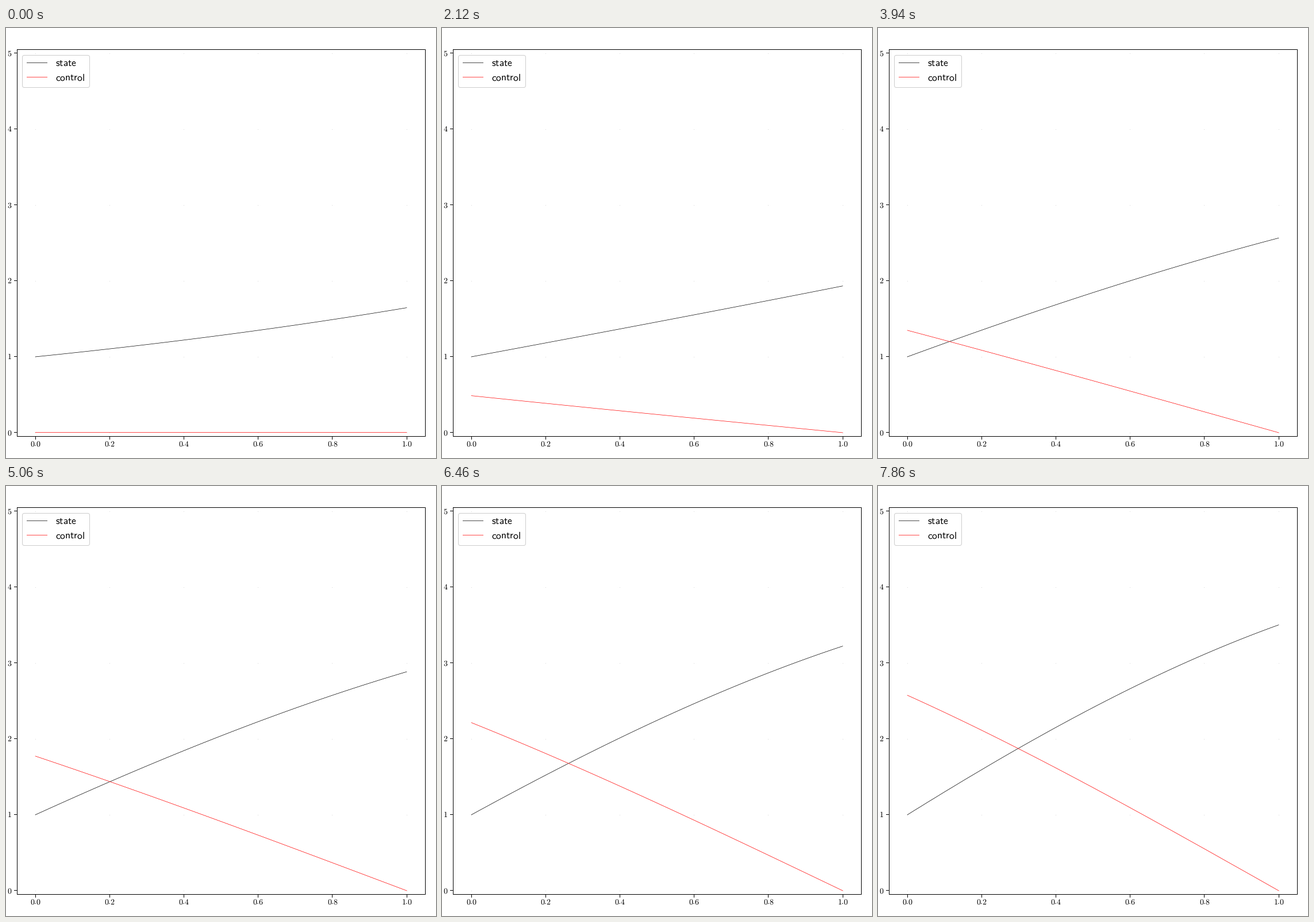
Write a matplotlib script that moves like this. It is 748x748 px and loops after 8 s.

```python
import matplotlib.pyplot as plt
import numpy as np
from matplotlib.animation import FuncAnimation
from matplotlib.patches import FancyBboxPatch

SIZE, DPI = 748, 100
PX = 72 / DPI            # one pixel in points
TICK_MS = 20
FRAMES = 400
HOLD, STEP = 71, 7       # ticks before the first update, ticks per update
RATE = 0.05              # relaxation of the control
THIN = 0.7               # curve width in pixels

plt.rcParams["mathtext.fontset"] = "cm"
plt.rcParams["text.hinting"] = "none"
fig = plt.figure(figsize=(SIZE / DPI, SIZE / DPI), dpi=DPI, facecolor="white")
ax = fig.add_axes([0, 0, 1, 1])
ax.set_xlim(0, SIZE)
ax.set_ylim(SIZE, 0)
ax.axis("off")


def to_x(t):
    return 51.1 + 645.9 * t


def to_y(v):
    return 703.95 - 132 * v


def col(t):
    return np.floor(to_x(t)) + 0.5


def row(v):
    return np.ceil(to_y(v)) - 0.5


def line(xs, ys, color="black", width=1.0, **kw):
    return ax.plot(xs, ys, color=color, lw=width * PX, snap=False, **kw)[0]


def label(x, y, text, size, ha="center"):
    ax.text(x, y, f"${text}$", fontsize=size, ha=ha, va="baseline", zorder=7)


def sweep(n, updates):
    """Euler forward-backward sweep for x' = x/2 + u, p' = -x - p/2, p(1) = 0."""
    h = 1 / n
    u = np.zeros(n + 1)
    x, p = np.ones(n + 1), np.zeros(n + 1)
    states = []
    for k in range(updates + 1):
        old = u
        if k:
            u = (1 - RATE) * u + RATE * p
        for j in range(n):
            x[j + 1] = x[j] + h * (x[j] / 2 + old[j])
        for j in range(n, 0, -1):
            p[j - 1] = p[j] + h * (x[j] + p[j] / 2)
        if k:
            u = (1 - RATE) * old + RATE * p
        states.append((x.copy(), u))
    return states


# grid crossings, ticks and tick labels
xticks = np.linspace(0, 1, 6)
yticks = np.arange(6)
gx, gy = np.meshgrid(col(xticks), row(yticks))
ax.plot(gx.ravel(), gy.ravel(), ls="none", marker="s", ms=PX, mew=0,
        color="#d8d8d8", snap=False, zorder=1)

for t in xticks:
    line([col(t)] * 2, [710.5, 715.5])
    label(to_x(t) + 0.3, 728, f"{t:.1f}", 10)
for v in yticks:
    line([14.5, 19.5], [row(v)] * 2)
    label(6.1, to_y(v) + 4.5, str(v), 10)

# curves
N = 100
T = np.linspace(0, 1, N + 1)
STATES = sweep(N, (FRAMES - 1 - HOLD) // STEP + 1)
state = line(to_x(T), to_y(STATES[0][0]), width=THIN, zorder=3)
control = line(to_x(T), to_y(STATES[0][1]), "red", width=THIN, zorder=3)

# frame
line([19.5, 729.5, 729.5, 19.5, 19.5], [37.5, 37.5, 710.5, 710.5, 37.5],
     zorder=4, solid_joinstyle="miter")

# legend
ax.add_patch(FancyBboxPatch((28.5, 47.5), 117, 56, snap=False,
                            boxstyle="round,pad=0,rounding_size=3.6",
                            fc="white", ec="#cccccc", lw=PX, zorder=5))
for name, y, color in (("state", 60.5, "black"), ("control", 85.5, "red")):
    line([36, 72], [y, y], color, THIN, zorder=6, solid_capstyle="butt")
    label(86, y + 5.9, rf"\mathsf{{{name}}}", 12.6, ha="left")


def update(i):
    k = 0 if i < HOLD else (i - HOLD) // STEP + 1
    x, u = STATES[k]
    state.set_ydata(to_y(x))
    # a flat line sits on the pixel row of its tick
    control.set_ydata(to_y(u) if u.any() else np.full(N + 1, row(0)))
    return state, control


anim = FuncAnimation(fig, update, frames=FRAMES, interval=TICK_MS,
                     repeat=True, repeat_delay=0, blit=False)
plt.show()
```
